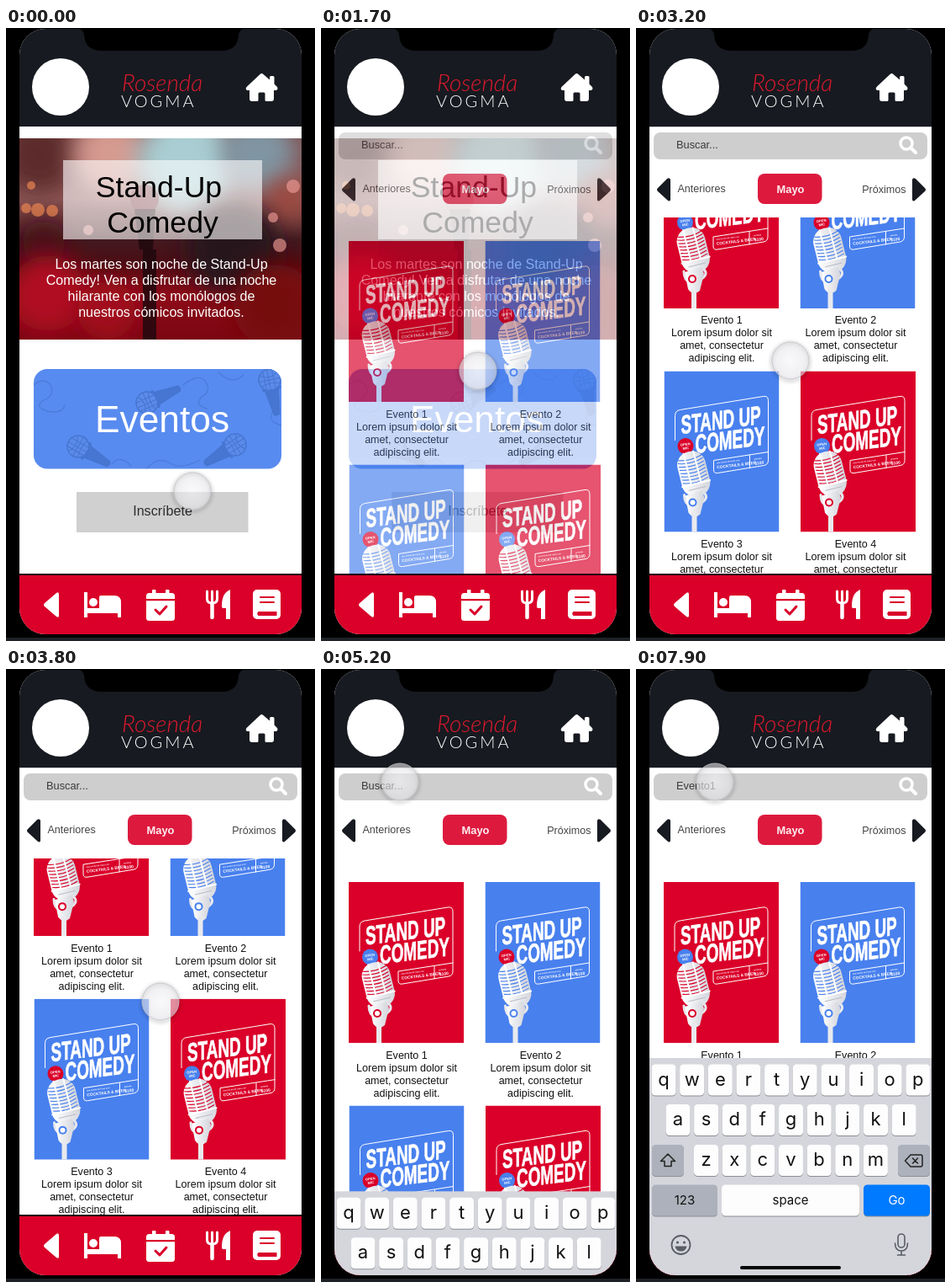
Write an HTML page that moves like this. It is 368 by 728 pixels and loops after 8000 ms.

```html
<!DOCTYPE html>
<html lang="es">
<head>
<meta charset="utf-8">
<title>Eventos</title>
<style>
html, body { margin: 0; width: 100%; height: 100%; overflow: hidden; background: #000; }
svg { display: block; width: 100vw; height: 100vh; }
text { font-family: "Liberation Sans", Arial, sans-serif; white-space: pre; }
.mid { text-anchor: middle; }
.keys text { font-family: Inter, Roboto, sans-serif; }
.brand text { font-family: Lato, "Open Sans", sans-serif; font-weight: 300; }
</style>
</head>
<body>
<svg id="stage" viewBox="0 0 368 728" preserveAspectRatio="none"></svg>
<script>
const RED = '#da0029', BLUE = '#4880ee', INK = '#171a20';
const stage = document.getElementById('stage');

const text = (x, y, size, str, attrs = '') =>
  `<text x="${x}" y="${y}" font-size="${size}" ${attrs}>${str}</text>`;
const mid = (x, y, size, str, attrs = '') => text(x, y, size, str, 'class="mid" ' + attrs);
const rect = (x, y, w, h, fill, r = 0, attrs = '') =>
  `<rect x="${x}" y="${y}" width="${w}" height="${h}" rx="${r}" fill="${fill}" ${attrs}/>`;
const dot = (x, y, r, fill, attrs = '') =>
  `<circle cx="${x}" cy="${y}" r="${r}" fill="${fill}" ${attrs}/>`;
const path = (d, attrs = '') => `<path d="${d}" ${attrs}/>`;
const line = (d, color, width, attrs = '') =>
  path(d, `fill="none" stroke="${color}" stroke-width="${width}" stroke-linecap="round" stroke-linejoin="round" ${attrs}`);
const lines = (x, y, size, step, list, attrs = '') =>
  list.map((s, i) => mid(x, y + i * step, size, s, attrs)).join('');

const defs = `<defs>
  <clipPath id="phone"><rect x="16" y="1" width="336" height="719" rx="31"/></clipPath>
  <clipPath id="feed"><rect x="16" y="225" width="336" height="423"/></clipPath>
  <clipPath id="photo"><rect x="16" y="131" width="336" height="239"/></clipPath>
  <clipPath id="card"><rect x="33" y="405" width="295" height="118.500" rx="16"/></clipPath>
  <clipPath id="poster"><rect width="137" height="191"/></clipPath>
  <linearGradient id="sky" x2="0" y2="1">
    <stop offset="0" stop-color="#805050"/><stop offset=".3" stop-color="#8d5555"/>
    <stop offset=".5" stop-color="#421a20"/><stop offset=".62" stop-color="#4c0c14"/>
    <stop offset=".78" stop-color="#8f0b18"/><stop offset="1" stop-color="#7a0612"/>
  </linearGradient>
  <linearGradient id="metal"><stop offset="0" stop-color="#fff"/><stop offset="1" stop-color="#d3d5dc"/></linearGradient>
  <radialGradient id="touch"><stop offset="0" stop-color="#f6f6f8" stop-opacity=".62"/>
    <stop offset="1" stop-color="#e2e2e6" stop-opacity=".6"/></radialGradient>
  <filter id="soft" x="-60%" y="-60%" width="220%" height="220%"><feGaussianBlur stdDeviation="14"/></filter>
  <filter id="blur" x="-60%" y="-60%" width="220%" height="220%"><feGaussianBlur stdDeviation="2"/></filter>
</defs>`;

function header() {
  const home = 'M302.500 55 q2-2 4 0 l7.500 6.500 v-3 q0-1.500 1.500-1.500 h2.500 q1.500 0 1.500 1.500 v8 l3.500 3.500 q1.500 3-1.500 4 h-2.500 v10 q0 3-3 3 h-6 q-1.500 0-1.500-1.500 v-7.500 q0-1.500-1.500-1.500 h-5 q-1.500 0-1.500 1.500 v7.500 q0 1.500-1.500 1.500 h-6 q-3 0-3-3 v-10 h-2.500 q-3-1-1-4z';
  return rect(16, 0, 336, 117, INK) + dot(65, 70, 34, '#fff') +
    `<g class="brand">${text(138, 75, 28, 'Rosenda', 'fill="#e0182e" font-style="italic"')}
    ${text(137, 94, 20, 'VOGMA', 'fill="#fff" letter-spacing="3"')}</g>` +
    path(home, 'fill="#fff"');
}

function nav() {
  const w = 'fill="#fff"';
  return rect(16, 648, 336, 2, '#1a0508') + rect(16, 650, 336, 71, RED) +
    path('M63 673 v25 q0 3-3 1 L46 687 q-2-2 0-4 L60 671 q3-2 3 2z', w) +
    path('M93 670 h4 v19 h14 v-13 q0-2 2-2 h16 q8 0 8 8 v18 h-4 v-5 h-36 v5 h-4z', w) + dot(104, 682, 5, '#fff') +
    rect(167, 671, 34, 33, '#fff', 3.5) + rect(174, 667, 4.5, 8, '#fff', 1) + rect(190, 667, 4.5, 8, '#fff', 1) +
    rect(167, 678, 34, 2.200, RED) + line('M178 691 l5 5 l8-9', RED, 3) +
    line('M239.500 669 v9 q0 5 6 5 q6 0 6-5 v-9 M245.500 669 v12', '#fff', 3) + line('M245.500 684 v16', '#fff', 4.5) +
    path('M267 667 v35 h-5 v-13 h-4 q-1.500-1-1-3 q0-15 10-19z', w) +
    rect(294, 667, 33, 35, '#fff', 5) + line('M303 676 h16 M303 682 h16', RED, 2) +
    path('M300.500 693 h22 v5 h-22 q-2.500-2.500 0-5z', `fill="${RED}"`);
}

function photo() {
  const glow = [[40, 150, 45, '#5c2a2c'], [125, 150, 45, '#d59a90'], [215, 160, 60, '#a9cdd2'],
    [300, 150, 45, '#8095a2'], [335, 205, 26, '#9c4a40'], [270, 262, 55, '#25121a'],
    [45, 255, 26, '#491017'], [50, 315, 45, '#b01020'], [120, 335, 35, '#a30d1a'], [320, 330, 50, '#76070f']];
  const bokeh = [[38, 216, 8], [55, 217, 7], [24, 214, 6], [30, 187, 5], [326, 258, 8], [342, 188, 8], [318, 225, 6], [98, 240, 6]];
  return `<g clip-path="url(#photo)">` + rect(16, 131, 336, 239, 'url(#sky)') +
    glow.map(([x, y, r, c]) => dot(x, y, r, c, 'filter="url(#soft)"')).join('') +
    bokeh.map(([x, y, r], i) => dot(x, y, r, i < 4 ? '#f28a52' : '#ee9a94', 'opacity=".65"')).join('') +
    dot(165, 203, 17, '#7d3038', 'opacity=".7"') +
    path('M153 215 h25 l-3 48 h4 v107 h-16 v-107 h-4z', 'fill="#1c080d" opacity=".8"') + '</g>' +
    rect(68, 157, 237, 94, '#fff', 0, 'opacity=".6"');
}

function cardMic(x, y, turn) {
  return `<g transform="translate(${x} ${y}) rotate(${turn})">` +
    path('M10-9 L42-4 Q45 0 42 4 L10 9z', 'fill="#4675d2"') +
    dot(0, 0, 13, '#5a8bea', 'stroke="#4675d2" stroke-width="1.500"') +
    line('M-7-10 Q0 0-7 10 M0-13 V13 M6-11 Q2 0 6 11 M-12-5 H12 M-13 1 H13 M-11 6 H11', '#4675d2', 1) +
    line('M11-10 Q15 0 11 10', '#4675d2', 3) + '</g>';
}

function welcome() {
  const cords = 'M33 424 q12-10 20 0 q6 12-8 18 q-12 8 4 13 q18 4 21-7 M126 518 q10-12 23 2 M211 424 q18-15 27-4 q7 12-5 18 q-9 10 6 14 M168 523 q12-15 28-6 q12 8 35-4 M318 455 q-8 12 10 17 M253 409 q16 16 30 3';
  return rect(16, 117, 336, 532, '#fff') + photo() +
    mid(182, 201, 35.600, 'Stand-Up') + mid(186.500, 243, 35.600, 'Comedy') +
    lines(185, 286, 16.100, 19, ['Los martes son noche de Stand-Up', 'Comedy! Ven a disfrutar de una noche',
      'hilarante con los monólogos de', 'nuestros cómicos invitados.'], 'fill="#fff"') +
    `<g clip-path="url(#card)">${rect(33, 405, 295, 119, '#588bef')}${line(cords, '#4b7bda', 1.300)}
    ${cardMic(86, 497, 30)}${cardMic(168, 445, -24)}${cardMic(273, 495, 148)}${cardMic(314, 418, 78)}</g>` +
    mid(186, 480, 44.300, 'Eventos', 'fill="#fff"') +
    rect(84, 551, 204.500, 48, '#d0d0d0') + mid(186.500, 579, 16.100, 'Inscríbete', 'fill="#2b2b2b"');
}

function poster(x, y, bg, badge) {
  let grill = '';
  for (let i = 0; i < 8; i++) grill += `M-15 ${i * 4 - 19} Q0 ${i * 4 - 14} 15 ${i * 4 - 19}`;
  const type = (tx, ty, str) => `<g transform="matrix(.61 -.075 0 1 ${tx} ${ty})">` +
    text(0, 0, 31, str, 'font-weight="700" fill="#fff" stroke="#fff" stroke-width=".8"') + '</g>';
  return `<g transform="translate(${x} ${y})" clip-path="url(#poster)">` + rect(0, 0, 137, 191, bg) +
    line('M13 82 V53 Q13 47 19 46 L118 30 Q124 29 124 35 V106 Q124 111 119 112 L64 121 Q59 122 59 117 V106 L124 96 M102 100 V115', '#fff', 1) +
    type(20, 74.500, 'STAND UP') + type(37, 97.500, 'COMEDY') +
    `<g transform="rotate(-7 62 115)" fill="#fff" font-weight="700">${text(63, 110, 2.500, 'una noche de risas con')}
    ${text(63, 116, 4.800, 'COCKTAILS &amp; BEER')}${text(108, 111, 2.500, 'entrada')}${text(108, 117, 5, '$100')}</g>` +
    dot(25.500, 89, 9.500, badge) +
    `<g transform="rotate(-7 25 89)" fill="#fff" font-weight="700">${mid(25.500, 88.500, 4.200, 'OPEN')}${mid(25.500, 93, 4.200, 'MIC')}</g>` +
    line('M47 144 Q54 150 45 156 M24 147 Q24 158 32 160', '#e6e7ec', 3) +
    `<g transform="translate(35 121) rotate(-14)">${rect(-17, -26, 34, 54, 'url(#metal)', 16)}
    ${line(grill, bg, 1.100)}${line('M-17 13 H17 M-6-25 V12 M6-25 V12', '#fff', 2)}${line('M-10 19 H10', '#b9bcc6', 1)}</g>` +
    path('M25 148 L45 142 L48 150 L43 170 Q35 177 29 168z', 'fill="url(#metal)"') +
    dot(34, 156, 5, bg) + dot(34, 156, 3, '#fff') + rect(33, 168, 6, 23, '#e9eaee') + '</g>';
}

function entry(n, x, cx, y, bg, badge) {
  return poster(x, y, bg, badge) + lines(cx, y + 209.500, 12.550, 15,
    ['Evento ' + n, 'Lorem ipsum dolor sit', 'amet, consectetur', 'adipiscing elit.'], 'fill="#111"');
}

function listing() {
  return rect(16, 117, 336, 532, '#fff') + rect(16, 117, 336, 1, '#c9c9cb') +
    rect(21, 124, 326, 32, '#cecece', 8) +
    dot(322, 137, 7, 'none', 'stroke="#fff" stroke-width="3.500"') + line('M327.500 142.500 l5.500 5.500', '#fff', 4) +
    '<text id="query" x="48" y="143" font-size="12.800" fill="#3b3b3b"></text>' +
    rect(48.500, 131, 1, 15, '#222', 0, 'id="caret"') +
    path('M41 180 v24 q-1 3-4 0 L26 194 q-2-2 0-4 L37 179 q3-2 4 1z', `fill="${INK}"`) +
    path('M329 180 v24 q1 3 4 0 L344 194 q2-2 0-4 L333 179 q-3-2-4 1z', `fill="${INK}"`) +
    text(49.500, 195, 12.550, 'Anteriores', 'fill="#444"') +
    text(321.500, 196, 12.550, 'Próximos', 'fill="#444" text-anchor="end"') +
    rect(145, 173, 76.500, 36, '#dd1a3e', 8) + mid(184, 196, 12.900, 'Mayo', 'fill="#fdeef1" font-weight="700"') +
    '<g clip-path="url(#feed)"><g id="scroll">' +
    entry(1, 33, 102, 253, RED, BLUE) + entry(2, 195.500, 261.500, 253, BLUE, RED) +
    entry(3, 33.500, 102, 518.500, BLUE, RED) + entry(4, 196, 261.500, 518.500, RED, BLUE) + '</g></g>';
}

function keyboard() {
  const key = (x, y, w, label, size, fill = '#fdfdfe', color = '#111') =>
    rect(x, y + 1, w, 37, '#8c8e95', 4.500) + rect(x, y, w, 37, fill, 4.500) +
    mid(x + w / 2, y + (size > 20 ? 25 : 23.500), size, label, `fill="${color}"`);
  const row = (str, x, y) => [...str].map((c, i) => key(x + i * 33.650, y, 29, c, 22)).join('');
  const gray = '#adb1bb';
  return rect(16, 462, 336, 260, '#d5d6dc') +
    row('qwertyuiop', 18.500, 469.500) + row('asdfghjkl', 35.500, 517) + row('zxcvbnm', 69, 565) +
    key(19, 565, 38, '', 15, gray) + key(312, 565, 38, '', 15, gray) +
    line('M38 576 l8.500 8.500 h-4.500 v6 h-8 v-6 h-4.500z', '#222', 1.500) +
    line('M327 577 h12 q2 0 2 2 v10 q0 2-2 2 h-12 l-6.500-7z M329.500 581 l6 6 m0-6 l-6 6', '#222', 1.500) +
    key(19, 612.500, 78, '123', 15, gray) + key(102, 612.500, 164, 'space', 15) + key(271, 612.500, 79, 'Go', 15, '#007aff', '#fff') +
    dot(53.500, 684, 11, 'none', 'stroke="#5a5d64" stroke-width="1.800"') + dot(49.500, 681, 1.600, '#5a5d64') + dot(57.500, 681, 1.600, '#5a5d64') +
    path('M46.500 685.500 h14 q-1 6-7 6 q-6 0-7-6z', 'fill="#5a5d64"') +
    rect(312, 671, 8, 16, 'none', 4, 'stroke="#5a5d64" stroke-width="1.600"') +
    line('M308.500 682 q0 9 7.500 9 q7.500 0 7.500-9 M316 691 v5 M311.500 696 h9', '#5a5d64', 1.600) +
    rect(124, 709, 120, 4, '#050505', 2);
}

stage.innerHTML = defs + rect(0, 0, 368, 728, '#000') + rect(0, 724, 368, 4, '#1e2125') +
  `<g clip-path="url(#phone)">${rect(16, 0, 336, 722, '#fff')}
  <g id="welcome">${welcome()}</g><g id="listing">${listing()}</g>${header()}${nav()}
  <g id="keyboard" class="keys">${keyboard()}</g></g>` +
  path('M84 0 Q92 1 93 8 Q94 27 114 27 H257 Q276 27 277 8 Q278 1 286 0z', 'fill="#000"') +
  `<g id="cursor">${dot(0, 1.500, 22.500, 'none', 'stroke="#000" stroke-opacity=".3" stroke-width="2" filter="url(#blur)"')}
  ${dot(0, 0, 22, 'url(#touch)', 'stroke="#c4c4c8" stroke-opacity=".8" stroke-width="1"')}</g>`;

const el = id => document.getElementById(id);
const parts = Object.fromEntries(['welcome', 'listing', 'scroll', 'query', 'caret', 'keyboard', 'cursor'].map(id => [id, el(id)]));

const LOOP = 8000;
const smooth = u => u * u * (3 - 2 * u);
const linear = u => u;

// Each row: time, then one or more values.
const moves = [[0, 222, 550], [100, 222, 550], [500, 168, 215], [700, 170, 225], [900, 181, 349], [1000, 174, 422],
  [1100, 174, 425], [1600, 174, 425], [2100, 296, 256], [2350, 296, 256], [2750, 184, 395], [4700, 184, 395],
  [4800, 184, 243], [4900, 82, 165], [5000, 94, 134]];
const press = [[1150, 1], [1200, .92], [1300, .92], [1350, 1], [5000, 1], [5050, .96], [5150, 1]];
const dissolve = [[1500, 0], [1800, 1]];
const scrolls = [[2800, 0], [3200, 111], [3400, 130], [3750, 130], [4300, 0]];
const slide = [[5150, 262], [5480, 0]];
const typed = [[6100, 'E'], [6400, 'Ev'], [6500, 'Eve'], [6700, 'Even'], [6800, 'Event'], [7000, 'Evento'], [7400, 'Evento1']];

function track(rows, t, ease = smooth) {
  const i = rows.findIndex(r => r[0] > t);
  if (i === 0) return rows[0].slice(1);
  if (i < 0) return rows[rows.length - 1].slice(1);
  const a = rows[i - 1], b = rows[i], u = ease((t - a[0]) / (b[0] - a[0]));
  return a.slice(1).map((v, k) => v + (b[k + 1] - v) * u);
}

function draw(t) {
  const [x, y] = track(moves, t), [size] = track(press, t);
  parts.cursor.setAttribute('transform', `translate(${x} ${y}) scale(${size})`);
  const [shown] = track(dissolve, t, linear);
  parts.listing.setAttribute('opacity', shown);
  parts.scroll.setAttribute('transform', `translate(0 ${-track(scrolls, t)[0]})`);
  parts.keyboard.setAttribute('transform', `translate(0 ${track(slide, t, u => 1 - (1 - u) ** 3)[0]})`);

  const last = typed.filter(r => r[0] <= t).pop();
  parts.query.textContent = last ? last[1] : 'Buscar...';
  const since = t - (last ? last[0] : 5400);
  parts.caret.setAttribute('opacity', since >= 0 && since % 1000 < 500 ? 1 : 0);
  parts.caret.setAttribute('x', last ? 48 + parts.query.getComputedTextLength() : 48.5);
}

const start = performance.now();
function tick() {
  draw((performance.now() - start) % LOOP);
  requestAnimationFrame(tick);
}
tick();
</script>
</body>
</html>
```
